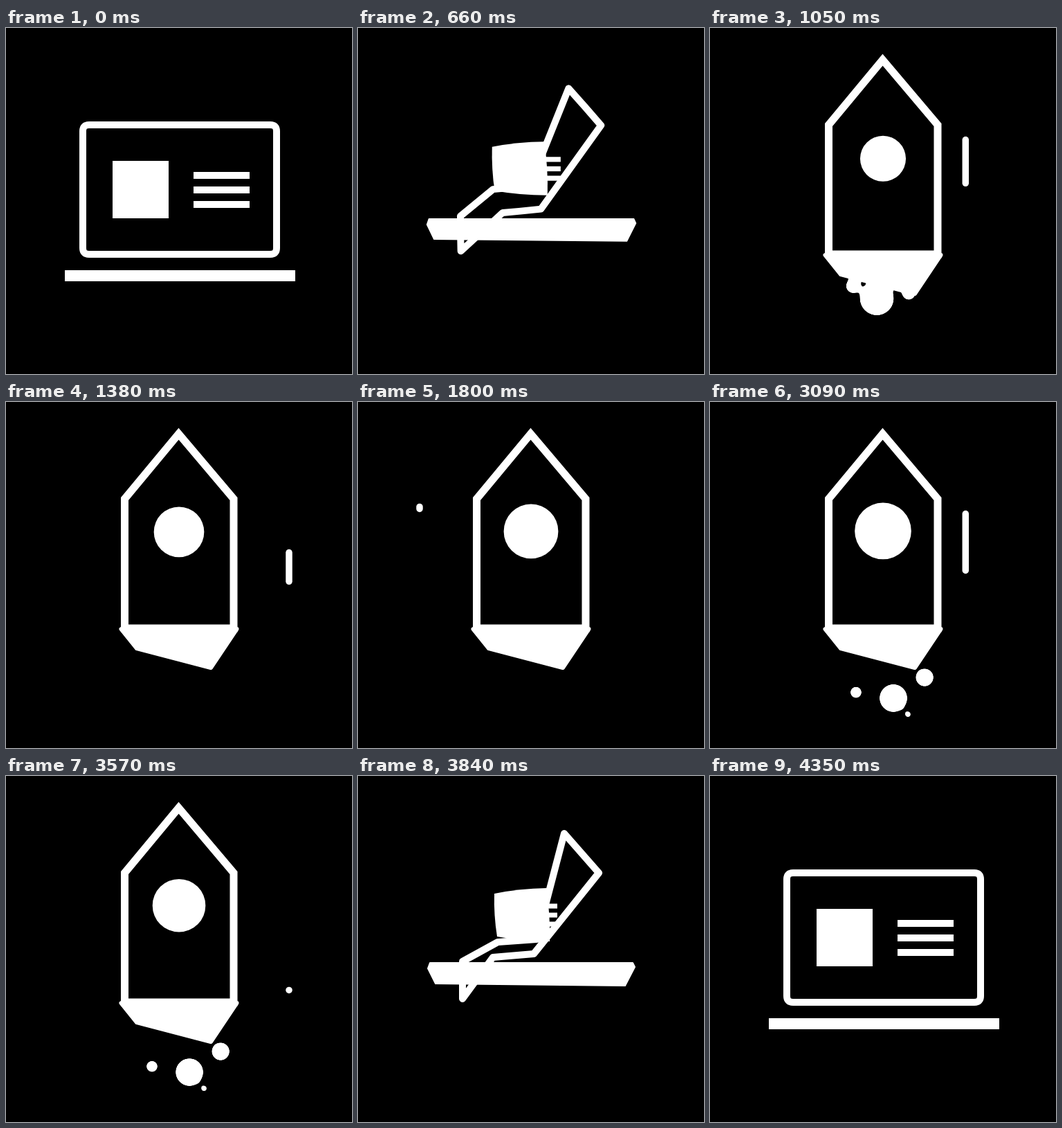
Write an HTML page that moves like this. It is 500x500 px and loops after 4.74 s.

```html
<!DOCTYPE html>
<html lang="en">
<head>
<meta charset="utf-8">
<title>Laptop to rocket</title>
<style>
  html, body { margin: 0; width: 100%; height: 100%; overflow: hidden; background: #000; }
  svg { display: block; width: 100vw; height: 100vh; }
</style>
</head>
<body>
<svg viewBox="0 0 500 500" fill="#fff" stroke="#fff">
  <defs>
    <filter id="goo" filterUnits="userSpaceOnUse" x="100" y="250" width="300" height="250" color-interpolation-filters="sRGB">
      <feGaussianBlur stdDeviation="4"/>
      <feColorMatrix values="1 0 0 0 0  0 1 0 0 0  0 0 1 0 0  0 0 0 18 -8.5"/>
    </filter>
  </defs>
  <g id="flame" filter="url(#goo)"><path id="nozzle" stroke="none"/></g>
  <path id="body" fill="none"/>
  <path id="base" stroke-linejoin="round"/>
  <path id="panel" stroke="none"/>
  <g id="rows"></g>
  <g id="streaks" stroke-width="9.5" stroke-linecap="round"></g>
</svg>
<script>
const LOOP = 4740, STEP = 30;
const $ = id => document.getElementById(id);
const mod = (a, n) => ((a % n) + n) % n;
const clamp = v => Math.min(1, Math.max(0, v));
const mix = (a, b, k) => a + (b - a) * k;
const easeOut = (k, n) => 1 - (1 - clamp(k)) ** n;

function add(parent, tag, attrs = {}) {
  const el = document.createElementNS('http://www.w3.org/2000/svg', tag);
  set(el, attrs);
  return parent.appendChild(el);
}
function set(el, attrs) {
  for (const key in attrs) el.setAttribute(key, attrs[key]);
}

// Each pose list runs rocket, half way, laptop.
const BODY = [
  [[249.5, 46], [329, 140], [329, 327], [329, 327], [171.5, 327], [171.5, 327], [171.5, 140], [171.5, 140]],
  [[298, 83], [348, 140], [254, 257], [195, 262], [151, 322], [151, 268], [202, 240], [258, 236]],
  [[382, 140], [391, 149], [391, 318], [382, 327], [120, 327], [111, 318], [111, 149], [120, 140]]
];
const BASE = [
  [[166.5, 328], [333.5, 328], [333.5, 328], [296, 384], [189, 356], [166.5, 328]],
  [[104, 270], [397, 270], [400, 276], [386, 303], [112, 300], [101, 278]],
  [[85, 350], [418, 350], [418, 358], [418, 366], [85, 366], [85, 358]]
];
const PANEL = [
  null,
  [[197, 170], [272, 162], [277, 239], [201, 232]],
  [[154, 192], [235, 192], [235, 275], [154, 275]]
];
// Row: left, right, middle y, spacing, thickness
const ROWS = [[250, 250, 187, 0, 0], [264, 288, 201, 13, 7], [271, 352, 234, 21, 10]];
const OUTWARD = [[1, -1], [1, 1], [-1, 1], [-1, -1]];

const DROPS = [
  { x: 211.6, dx: 55.4, y: 345, dy: 86, r: 24.8, grow: 0 },
  { x: 202, dx: 9.3, y: 315, dy: 108.5, r: 11, grow: 0 },
  { x: 259, dx: 53, y: 364.6, dy: 34.6, r: 7.8, grow: 14 },
  { x: 206, dx: 83, y: 325, dy: 131, r: 7.4, grow: 0 }
];
const STREAKS = [
  { x: 369.3, y: 161.5, delay: -60 },
  { x: 409, y: 217.5, delay: 294 },
  { x: 89, y: 62.5, delay: 50 }
];

const rowEls = [-1, 0, 1].map(() => add($('rows'), 'rect', { stroke: 'none' }));
const dropEls = DROPS.map(() => add($('flame'), 'circle', { stroke: 'none' }));
const streakEls = STREAKS.map(() => add($('streaks'), 'line'));

// 0 is the rocket, 1 half way, 2 the laptop
function poseAt(t) {
  if (t < 420) return 2;
  if (t < 670) return 2 - clamp((t - 410) / 260) ** 2;
  if (t < 3600) return 1 - easeOut((t - 670) / 330, 2);
  if (t < 3840) return ((t - 3600) / 240) ** 2;
  return 1 + easeOut((t - 3840) / 510, 4);
}

function blend(poses, m) {
  const i = m < 1 ? 0 : 1, k = m - i;
  const walk = (a, b) => Array.isArray(a) ? a.map((v, j) => walk(v, b[j])) : mix(a, b, k);
  return walk(poses[i], poses[i + 1]);
}
const polygon = pts => 'M' + pts.join('L') + 'Z';

function bodyPath(pts, bulge) {
  let d = '';
  OUTWARD.forEach(([sx, sy], i) => {
    const a = pts[2 * i], b = pts[2 * i + 1];
    const corner = [(a[0] + b[0]) / 2 + sx * bulge, (a[1] + b[1]) / 2 + sy * bulge];
    d += (i ? 'L' : 'M') + a + (bulge ? 'Q' + corner + ' ' : 'L') + b;
  });
  return d + 'Z';
}

function panelPath(pts, roundness) {
  return pts.reduce((d, p, i) => {
    const q = pts[(i + 1) % 4];
    const chord = Math.hypot(q[0] - p[0], q[1] - p[1]);
    const r = chord / (2 * Math.sin(roundness * Math.PI / 4));
    return d + (roundness > 0.002 ? `A${r} ${r} 0 0 1 ${q}` : 'L' + q);
  }, 'M' + pts[0]) + 'Z';
}

function circleCorners(t) {
  const r = 41.7 - 3.6e-6 * (t - 2600) ** 2;
  const cy = 186.2 + (41.7 - r) * 0.3, h = r * Math.SQRT1_2;
  return [[250 - h, cy - h], [250 + h, cy - h], [250 + h, cy + h], [250 - h, cy + h]];
}

function drawShapes(t, m) {
  const late = clamp(m - 1);
  set($('body'), {
    d: bodyPath(blend(BODY, m), 4.5 * late),
    'stroke-width': mix(11, 10, clamp(m)),
    'stroke-linejoin': m < 0.05 ? 'miter' : 'round'
  });
  const base = polygon(blend(BASE, m));
  set($('base'), { d: base, 'stroke-width': m < 1 ? mix(6, 2, m) : mix(2, 0, late) });
  set($('nozzle'), { d: base });

  const roundness = m < 1 ? mix(1, 0.12, m) : mix(0.12, 0, late);
  const poses = [circleCorners(t), PANEL[1], PANEL[2]];
  set($('panel'), { d: panelPath(blend(poses, m), roundness) });

  const [left, right, y, gap, thick] = blend(ROWS, m);
  rowEls.forEach((el, i) => set(el, {
    x: left, y: y + (i - 1) * gap - thick / 2, width: right - left, height: thick
  }));
}

function drawFlame(t) {
  const period = 479, age = mod(t - 993, period), birth = t - age, u = age / 300;
  const alive = birth >= 990 && birth < 3500 && u < 1;
  $('flame').style.display = alive ? '' : 'none';
  if (!alive) return;
  const fall = easeOut(u, 3.6), size = Math.min(1, u * 6) * (1 - u ** 3.4);
  DROPS.forEach((p, i) => set(dropEls[i], {
    cx: p.x + p.dx * fall, cy: p.y + p.dy * fall, r: (p.r + p.grow * u) * size
  }));
}

function drawStreaks(t) {
  STREAKS.forEach((s, i) => {
    const age = mod(t - 1050 - s.delay, 502), birth = t - age, u = age / 220;
    const alive = birth >= 960 && birth < 3480 && u > 0 && u < 1;
    streakEls[i].style.display = alive ? '' : 'none';
    set(streakEls[i], {
      x1: s.x, x2: s.x,
      y1: s.y + 92 * easeOut((u - 0.45) / 0.55, 2),
      y2: s.y + 92 * easeOut(u * 1.6, 2)
    });
  });
}

function draw(time) {
  const t = Math.floor(mod(time, LOOP) / STEP) * STEP;
  drawShapes(t, poseAt(t));
  drawFlame(t);
  drawStreaks(t);
}

const start = performance.now();
function tick() {
  draw(performance.now() - start);
  requestAnimationFrame(tick);
}
tick();
</script>
</body>
</html>
```
